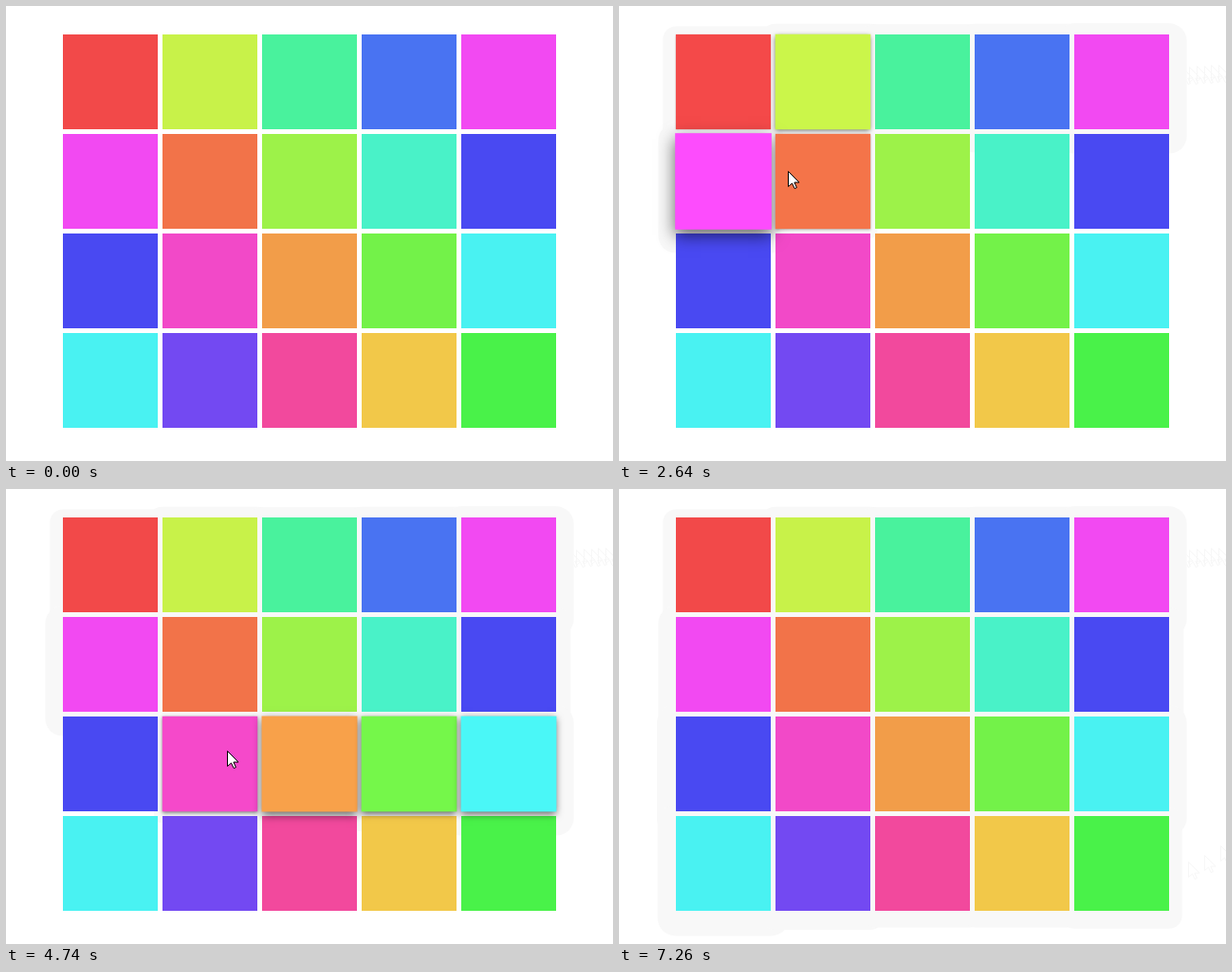
Write an HTML page with a canvas that moves like this. It is 640x480 px and loops after 7.83 s.

```html
<!DOCTYPE html>
<html lang="en">
<head>
<meta charset="utf-8">
<title>Hover grid</title>
<style>
html, body { margin: 0; width: 100%; height: 100%; overflow: hidden; background: #fff; }
canvas { display: block; }
</style>
</head>
<body>
<canvas id="stage" width="640" height="480"></canvas>
<script>
const ctx = document.getElementById('stage').getContext('2d');
const LOOP = 7830, STEP = 30, COUNT = LOOP / STEP;
const RISE = 450, FALL = 1250;   // ms for a full fade in / out
const SIZE = 100, PITCH = 105;

// key points of the pointer's sweep: time, x, y
const path = [
  [210, 648, 61], [1260, 372, 78], [2070, 143, 93],
  [2240, 120, 142], [2600, 165, 172], [3150, 393, 187],
  [3700, 532, 235], [4150, 480, 262], [4740, 233, 276],
  [5080, 125, 298], [5520, 100, 358], [5850, 165, 382],
  [6480, 480, 402], [6720, 600, 393], [6810, 652, 365]
];

function slope(i, k) {
  const a = path[Math.max(0, i - 1)], b = path[Math.min(path.length - 1, i + 1)];
  return (b[k] - a[k]) / (b[0] - a[0]);
}

// smooth curve through the key points
function pointer(t) {
  const i = path.findIndex(p => t < p[0]) - 1;
  if (i < 0) return null;
  const a = path[i], b = path[i + 1], d = b[0] - a[0], u = (t - a[0]) / d;
  const s = u * u * (3 - 2 * u);
  const at = k => Math.round(a[k] + (b[k] - a[k]) * s
    + d * u * (1 - u) * (slope(i, k) * (1 - u) - slope(i + 1, k) * u));
  return { x: at(1), y: at(2) };
}

const spots = Array.from({ length: COUNT }, (_, n) => pointer(n * STEP));

const tiles = Array.from({ length: 20 }, (_, i) => {
  const c = i % 5, r = Math.floor(i / 5);
  return { x: 60 + c * PITCH, y: 30 + r * PITCH, hue: (75 * c + 300 * r) % 360 };
});

const inside = (p, tile) => p && p.x >= tile.x && p.x < tile.x + SIZE
  && p.y >= tile.y && p.y < tile.y + SIZE;

// hover level and highest level so far, for every step
for (const tile of tiles) {
  let level = 0, peak = 0;
  tile.level = [];
  tile.peak = [];
  for (const p of spots) {
    level = inside(p, tile) ? Math.min(1, level + STEP / RISE) : Math.max(0, level - STEP / FALL);
    peak = Math.max(peak, level);
    tile.level.push(level);
    tile.peak.push(peak);
  }
}

function color(hue, value) {
  const channel = n => {
    const k = (n + hue / 60) % 6;
    return Math.round(255 * value * (1 - 0.7 * Math.max(0, Math.min(k, 4 - k, 1))));
  };
  return `rgb(${channel(5)},${channel(3)},${channel(1)})`;
}

const arrow = new Path2D('M.5 .5V16.5L4.5 13L7.2 18.6L9.4 17.6L6.9 12.1H12Z');

function drawArrow(p, fill, stroke) {
  ctx.save();
  ctx.translate(p.x, p.y);
  ctx.fillStyle = fill;
  ctx.strokeStyle = stroke;
  ctx.fill(arrow);
  ctx.stroke(arrow);
  ctx.restore();
}

// faint trace left around a tile by its widest shadow
function drawHalo(tile, peak) {
  if (!peak) return;
  const m = Math.sqrt(peak), grow = 20 * m, side = SIZE + 2 * grow;
  ctx.fillStyle = '#f8f8f8';
  ctx.beginPath();
  ctx.roundRect(tile.x - grow, tile.y - grow + 7.5 * m, side, side, grow);
  ctx.fill();
}

function drawTile(tile, v) {
  ctx.save();
  if (v) {
    ctx.shadowColor = `rgba(0,0,0,${0.6 * Math.min(1, 4 * v)})`;
    ctx.shadowBlur = 20 * v;
    ctx.shadowOffsetY = 7 * v;
  }
  ctx.fillStyle = color(tile.hue, 0.95 + 0.05 * v);
  ctx.fillRect(tile.x - v, tile.y - v, SIZE + 2 * v, SIZE + 2 * v);
  ctx.restore();
}

function draw(n) {
  ctx.fillStyle = '#fff';
  ctx.fillRect(0, 0, 640, 480);
  for (const p of spots.slice(0, n)) {
    if (p && p.x > 590) drawArrow(p, 'transparent', '#f7f7f7');
  }
  for (const tile of tiles) drawHalo(tile, tile.peak[n]);
  for (const tile of tiles) if (!tile.level[n]) drawTile(tile, 0);
  for (const tile of tiles) if (tile.level[n]) drawTile(tile, tile.level[n]);
  if (spots[n]) drawArrow(spots[n], '#fff', '#000');
}

const start = performance.now();
function tick() {
  draw(Math.floor(((performance.now() - start) % LOOP) / STEP));
  requestAnimationFrame(tick);
}
tick();
</script>
</body>
</html>
```
